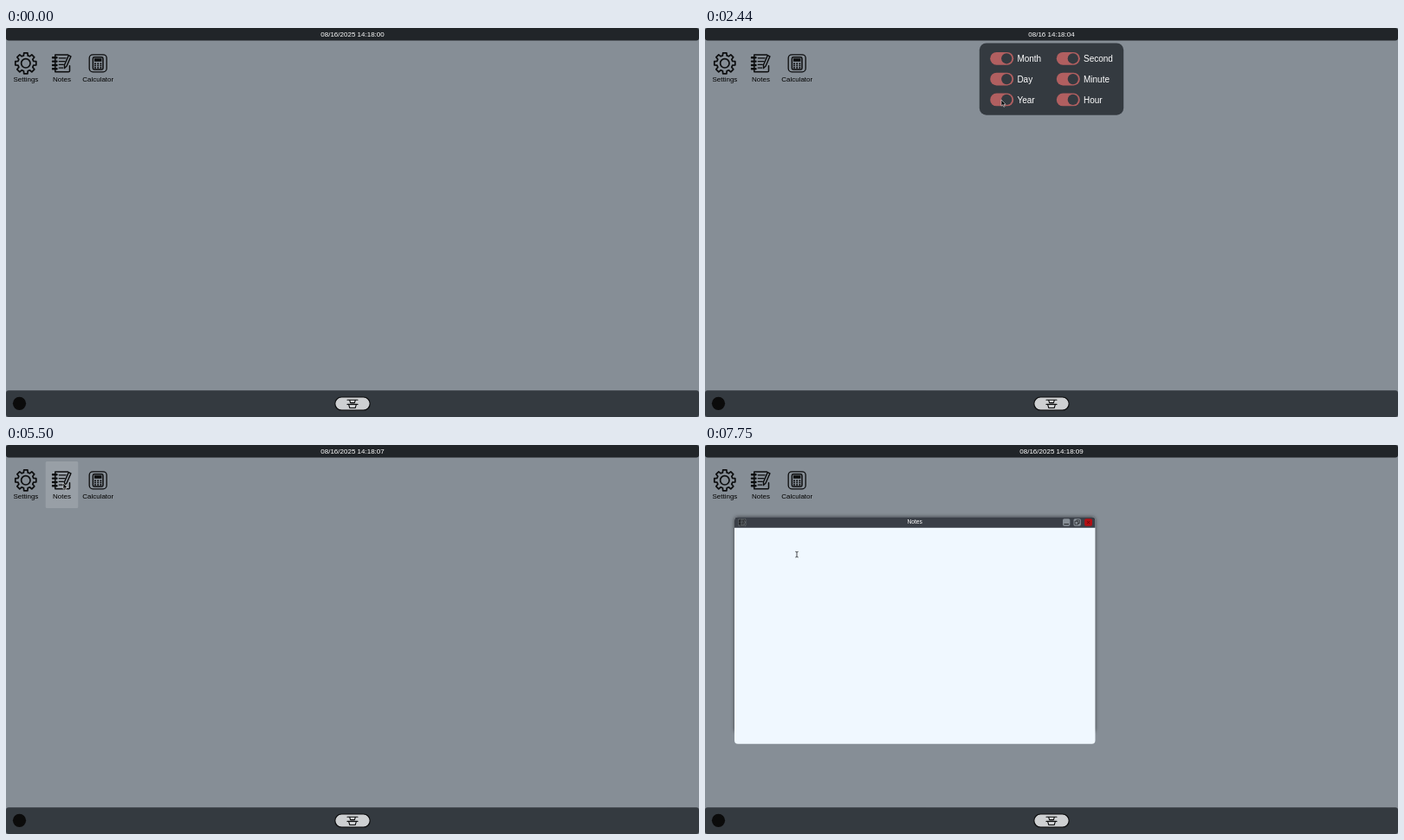
Recreate the animation shown at these times as an HTML page. Size 800 px wide and 450 px high, loop 8 s.

```html
<!DOCTYPE html>
<html lang="en">
<head>
<meta charset="utf-8">
<title>Desktop</title>
<style>
  html, body { margin: 0; width: 100%; height: 100%; overflow: hidden; background: #868e96; }
  svg { display: block; width: 100vw; height: 100vh; }
  text { font-family: "Liberation Sans", Arial, sans-serif; font-size: 8px; }
  .mid { text-anchor: middle; }
  .light { fill: #fff; }
  .line { fill: none; stroke: #0c0d0e; stroke-linecap: round; stroke-linejoin: round; }
</style>
</head>
<body>
<svg viewBox="0 0 800 450">
  <defs>
    <filter id="blur" x="-10%" y="-10%" width="120%" height="120%"><feGaussianBlur stdDeviation="2.2"/></filter>
    <g id="notebook" class="line" stroke-width="1.5">
      <path d="M-7.5 -9.9H7.2M9.2 3V8.6Q9.2 10 7.8 10H-7.5V-9.9"/>
      <path d="M-10.3 -6.5H-5.8M-10.3 -2.2H-5.8M-10.3 2.2H-5.8M-10.3 6.5H-5.8" stroke-width="2.4"/>
      <path d="M-3 -6H4.8M-3 -2.2H3.6M-3 1.6H2M-3 5.4H1.4" stroke-width="1.3"/>
      <path d="M8 -9.2L10.6 -7.9L5.8 3.2L3.2 5.8L3.2 2Z" stroke-width="1.4"/>
    </g>
  </defs>

  <rect width="800" height="450" fill="#868e96"/>
  <rect id="hover" y="19" width="37.6" height="54" rx="1.5" fill="#fff" fill-opacity=".15"/>

  <path id="gear" class="line" stroke-width="1.7" transform="translate(22.8 40.8)"/>
  <circle class="line" cx="22.8" cy="40.8" r="5.2" stroke-width="1.7"/>
  <use href="#notebook" x="64.3" y="40.8"/>
  <g transform="translate(106.2 40.8)">
    <rect class="line" x="-10" y="-10" width="20" height="20" rx="4" stroke-width="1.3"/>
    <rect class="line" x="-5.8" y="-7" width="11.6" height="14.2" rx="1.6" stroke-width="1.5"/>
    <rect x="-4.2" y="-5.6" width="8.4" height="3.6" fill="#0c0d0e"/>
    <g id="keys" fill="#0c0d0e"></g>
  </g>
  <g class="mid">
    <text x="22.9" y="61.8">Settings</text>
    <text x="64.5" y="61.8">Notes</text>
    <text x="106.2" y="61.8">Calculator</text>
  </g>

  <g id="window">
    <rect x="0" y="0" width="416.5" height="249" rx="4" fill="#000" fill-opacity=".55" filter="url(#blur)"/>
    <rect width="416.5" height="262.5" rx="4" fill="#f0f8ff"/>
    <path d="M0 12.5V4Q0 0 4 0H412.5Q416.5 0 416.5 4V12.5Z" fill="#3a3f47"/>
    <rect x="4.4" y="1.9" width="9" height="9" rx="1.5" fill="#686e74"/>
    <use href="#notebook" transform="translate(8.9 6.4) scale(.36)"/>
    <text class="mid light" x="208.2" y="8.3" style="font-size:6.67px">Notes</text>
    <g fill="#868e96">
      <rect x="379" y="2" width="8.4" height="8.6" rx="1.7"/>
      <rect x="391.5" y="2" width="8.4" height="8.6" rx="1.7"/>
      <rect x="404.2" y="2" width="8.8" height="8.6" rx="1.7" fill="#b30f14"/>
    </g>
    <g class="line" stroke-width=".8">
      <path d="M380.8 8.4H385.6"/>
      <path d="M393.4 5H396.8V8.8H393.4ZM395 5V3.6H398.3V7.4H396.8" stroke-width=".6"/>
      <path d="M407.4 5.1L409.8 7.5M409.8 5.1L407.4 7.5" stroke="#5c0508"/>
    </g>
  </g>

  <g id="panel">
    <rect x="316.8" y="17.5" width="166.4" height="83.2" rx="8" fill="#343a40"/>
  </g>

  <rect width="800" height="14.6" rx="3" fill="#212529"/>
  <text id="clock" class="mid light" x="400" y="10.2"></text>

  <rect y="419.2" width="800" height="30.8" rx="3" fill="#343a40"/>
  <circle cx="15.5" cy="434.3" r="7.6" fill="#0b0b0b"/>
  <rect x="379.8" y="427" width="40.4" height="15.2" rx="7.6" fill="#ced0d2" stroke="#0c0d0e" stroke-width="1.2"/>
  <path class="line" stroke-width="1.1" d="M394 430.2H406M396.6 430.2L397.6 433.6H402.4L403.4 430.2M394 435.4H406M395.6 435.4L396.8 439.5H403.2L404.4 435.4"/>

  <path id="arrow" d="M0 0V7.2L1.7 5.7L2.9 8.3L4.1 7.8L2.9 5.3H5.1Z" fill="#0c0d0e" stroke="#eee" stroke-width=".55"/>
  <path id="beam" class="line" stroke-width=".7" d="M-1.3 -3.3Q0 -3.3 0 -2.5V2.5Q0 3.3 -1.3 3.3M1.3 -3.3Q0 -3.3 0 -2.5M0 2.5Q0 3.3 1.3 3.3"/>
</svg>
<script>
const LOOP = 8000;
const PANEL_OPEN = 960, PANEL_CLOSE = 3680, WINDOW_OPEN = 5620;
const $ = id => document.getElementById(id);
const clamp = v => Math.max(0, Math.min(1, v));
const smooth = v => { v = clamp(v); return v * v * (3 - 2 * v); };
const show = (el, on) => el.setAttribute("visibility", on ? "visible" : "hidden");
const place = (el, [x, y]) => el.setAttribute("transform", `translate(${x.toFixed(2)} ${y.toFixed(2)})`);

function make(tag, attrs, parent) {
  const el = document.createElementNS("http://www.w3.org/2000/svg", tag);
  for (const k in attrs) el.setAttribute(k, attrs[k]);
  return parent.appendChild(el);
}

// Each point is [time, x, y]; motion eases between neighbours.
function along(points, t) {
  const i = points.findIndex(p => p[0] > t);
  if (i === 0) return points[0].slice(1);
  if (i < 0) return points[points.length - 1].slice(1);
  const a = points[i - 1], b = points[i], k = smooth((t - a[0]) / (b[0] - a[0]));
  return [a[1] + (b[1] - a[1]) * k, a[2] + (b[2] - a[2]) * k];
}

const windowPath = [[6150, 42, 56.3], [6250, 36, 58], [6810, 34, 83.2]];
const grip = [62, 11];
const pointerPath = [
  [60, 800, 450], [760, 408, 8], [1240, 408, 8], [1440, 411.5, 19],
  [1680, 342, 37], [1960, 342, 37], [2080, 342, 60], [2300, 342, 60],
  [2420, 342, 83], [2640, 342, 83], [2840, 419, 84], [3060, 419, 84],
  [3220, 420, 61.5], [3540, 420, 61.5], [4000, 107, 46], [4220, 24, 42],
  [4440, 65, 43], [4880, 65, 43], [5000, 66, 44], [5640, 66, 44], [6000, 104, 67.3],
  ...windowPath.map(([t, x, y]) => [t, x + grip[0], y + grip[1]]),
  [7180, 96, 94.2], [7320, 106, 126.6]
];

// Parts in clock order, each with the span during which it is switched off.
const parts = [
  { label: "Month", col: 0, row: 0, off: 1740, on: 1940 },
  { label: "Day", col: 0, row: 1, off: 2100, on: 2280 },
  { label: "Year", col: 0, row: 2, off: 2440, on: 2620 },
  { label: "Hour", col: 1, row: 2, off: 2860, on: 3040 },
  { label: "Minute", col: 1, row: 1, off: 3240, on: 3500 },
  { label: "Second", col: 1, row: 0, off: Infinity, on: Infinity }
];

for (const p of parts) {
  const x = 329.2 + 76.6 * p.col, y = 35.3 + 23.8 * p.row;
  make("rect", { x, y: y - 7.4, width: 27, height: 14.8, rx: 7.4, fill: "#b15f60" }, $("panel"));
  p.knob = make("circle", { cy: y, r: 6.1, fill: "#343a40" }, $("panel"));
  p.left = x + 8.2;
  const text = make("text", { x: x + 31.2, y: y + 3.6, class: "light", style: "font-size:10px" }, $("panel"));
  text.textContent = p.label;
}

for (let i = 0; i < 9; i++)
  make("circle", { cx: (i % 3 - 1) * 3.2, cy: 0.4 + Math.floor(i / 3) * 2.4, r: 1 }, $("keys"));

function gearPath() {
  const corners = [[-15, 9.2], [-10, 12.2], [10, 12.2], [15, 9.2]];
  let d = "";
  for (let tooth = 0; tooth < 8; tooth++)
    for (const [turn, r] of corners) {
      const a = (tooth * 45 + turn) * Math.PI / 180;
      d += `${d ? "L" : "M"}${(r * Math.sin(a)).toFixed(2)} ${(-r * Math.cos(a)).toFixed(2)}`;
    }
  return d + "Z";
}
$("gear").setAttribute("d", gearPath());

function clockText(t) {
  const second = t < 60 ? 0 : Math.floor((t - 190) / 1000) + 2;
  const values = ["08", "16", "2025", "14", "18", String(second).padStart(2, "0")];
  const kept = (from, to, sep) => values.slice(from, to)
    .filter((_, i) => !(t >= parts[from + i].off && t < parts[from + i].on)).join(sep);
  return kept(0, 3, "/") + " " + kept(3, 6, ":");
}

function draw(t) {
  const pointer = along(pointerPath, t), win = along(windowPath, t);
  const open = t >= WINDOW_OPEN;

  $("clock").textContent = clockText(t);
  $("panel").setAttribute("opacity", clamp((t - PANEL_OPEN) / 150) * clamp((PANEL_CLOSE + 120 - t) / 120));
  for (const p of parts) {
    const offness = smooth((t - p.off) / 120) - smooth((t - p.on) / 120);
    p.knob.setAttribute("cx", p.left + 10.8 * (1 - offness));
  }

  const tile = Math.floor((pointer[0] - 4) / 41.7);
  const inTile = tile >= 0 && tile < 3 && pointer[0] - 4 - tile * 41.7 < 37.6 && pointer[1] > 19 && pointer[1] < 73;
  show($("hover"), inTile && !open);
  $("hover").setAttribute("x", 4 + tile * 41.7);

  show($("window"), open);
  place($("window"), win);

  const typing = open && pointer[1] > win[1] + 12.5;
  show($("arrow"), t >= 60 && !typing);
  show($("beam"), typing);
  place($("arrow"), pointer);
  place($("beam"), pointer);
}

const start = performance.now();
function tick() {
  draw((performance.now() - start) % LOOP);
  requestAnimationFrame(tick);
}
tick();
</script>
</body>
</html>
```
